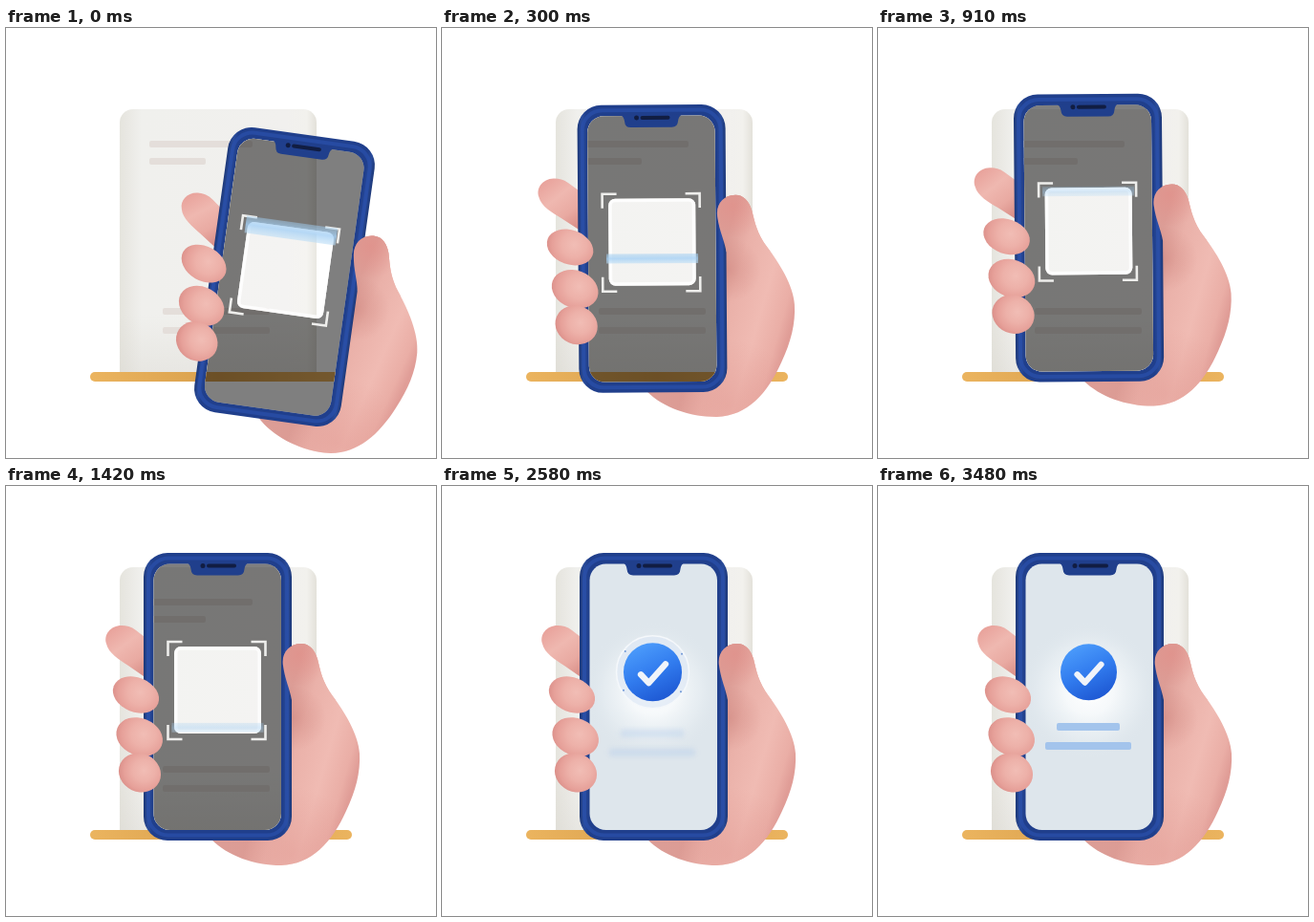
An HTML page with a canvas that plays this animation: 450x450 px, repeating every 3510 ms.

```html
<!DOCTYPE html>
<html lang="en">
<head>
<meta charset="utf-8">
<title>Scan to confirm</title>
<style>
  html, body { margin: 0; width: 100%; height: 100%; overflow: hidden; background: #fff; }
  canvas { display: block; width: 450px; height: 450px; }
</style>
</head>
<body>
<canvas id="stage"></canvas>
<script>
const SIZE = 450, LOOP = 3510, RAD = Math.PI / 180;
const canvas = document.getElementById('stage');
const ctx = canvas.getContext('2d');
const dpr = window.devicePixelRatio || 1;
canvas.width = canvas.height = SIZE * dpr;

// Settled phone centre; all phone and hand shapes are laid out around it.
const CX = 221.5, CY = 220.5;

const clamp = v => Math.max(0, Math.min(1, v));
const ramp = (t, a, b) => clamp((t - a) / (b - a));
const smooth = (t, a, b) => { const p = ramp(t, a, b); return p * p * (3 - 2 * p); };
const easeOut = p => 1 - (1 - p) ** 3;
const backOut = p => 1 + 2.7 * (p - 1) ** 3 + 1.7 * (p - 1) ** 2;

// Monotone cubic through [time, value] keys.
function track(keys, t) {
  const last = keys.length - 1;
  if (t <= keys[0][0]) return keys[0][1];
  if (t >= keys[last][0]) return keys[last][1];
  const slope = i => (keys[i + 1][1] - keys[i][1]) / (keys[i + 1][0] - keys[i][0]);
  const tangent = i => {
    if (i === 0 || i === last) return 0;
    const a = slope(i - 1), b = slope(i);
    return a * b > 0 ? 2 * a * b / (a + b) : 0;
  };
  let i = 0;
  while (t > keys[i + 1][0]) i++;
  const span = keys[i + 1][0] - keys[i][0], p = (t - keys[i][0]) / span;
  const p2 = p * p, p3 = p2 * p;
  return (2 * p3 - 3 * p2 + 1) * keys[i][1] + (p3 - 2 * p2 + p) * span * tangent(i)
    + (3 * p2 - 2 * p3) * keys[i + 1][1] + (p3 - p2) * span * tangent(i + 1);
}

const MOVE_X = [[0, 291.5], [300, 220], [580, 219], [1150, 221.5]];
const MOVE_Y = [[0, 260.5], [300, 231], [600, 218.3], [1150, 220.5]];
const TILT = [[0, 8], [300, -0.4], [600, -1.2], [1150, 0]];
const CURL = [[0, 0], [300, -1.4], [600, -4], [1150, 0]];

function gradient(g, stops) {
  stops.forEach(([at, color]) => g.addColorStop(at, color));
  return g;
}
const linear = (x0, y0, x1, y1, stops) => gradient(ctx.createLinearGradient(x0, y0, x1, y1), stops);
const radial = (x, y, r, stops) => gradient(ctx.createRadialGradient(x, y, 0, x, y, r), stops);

function box(x, y, w, h, r, fill) {
  ctx.beginPath();
  ctx.roundRect(x, y, w, h, r);
  ctx.fillStyle = fill;
  ctx.fill();
}

function stroke(path, color, width) {
  ctx.strokeStyle = color;
  ctx.lineWidth = width;
  ctx.stroke(path);
}

function basePose() {
  ctx.setTransform(dpr, 0, 0, dpr, 0, 0);
}

function phonePose(t) {
  basePose();
  ctx.translate(track(MOVE_X, t), track(MOVE_Y, t));
  ctx.rotate(track(TILT, t) * RAD);
  ctx.translate(-CX, -CY);
}

function drawPaper() {
  ctx.fillStyle = '#fff';
  ctx.fillRect(0, 0, SIZE, SIZE);
  box(119, 85, 206, 276, [14, 14, 0, 0], linear(119, 0, 325, 0, [
    [0, '#e5e4dd'], [0.04, '#e9e8e3'], [0.11, '#f0f0ed'], [0.85, '#f1f0ee'],
    [0.95, '#f2f1ed'], [1, '#e3e1da']]));
  box(119, 300, 206, 61, 0, linear(0, 300, 0, 361, [
    [0, 'rgba(215,212,205,0)'], [1, 'rgba(215,212,205,.35)']]));
  const line = '#e4deda';
  box(150, 118, 108, 7, 2, line);
  box(150, 136, 59, 7, 2, line);
  box(164, 293, 112, 7, 2, line);
  box(164, 313, 112, 7, 2, line);
  box(88, 360, 274, 10, 5, linear(88, 0, 362, 0, [
    [0, '#ebb45f'], [0.5, '#d9a04c'], [1, '#ebb45f']]));
}

const palm = new Path2D(
  'M309 165 C296 165 288 175 290 188 C292 203 297 212 299 224 L270 290 L215 370 ' +
  'C232 387 260 397 288 397 C320 396 341 373 356 340 C366 319 371 300 370 280 ' +
  'C369 260 354 236 342 220 C331 205 329 193 326 181 C323 171 317 165 309 165 Z');

function drawPalm() {
  ctx.fillStyle = linear(285, 260, 371, 285, [
    [0, '#dc9d96'], [0.25, '#eab1a9'], [0.62, '#f0bbb3'], [0.88, '#eaaea6'], [1, '#e09d97']]);
  ctx.fill(palm);
  ctx.save();
  ctx.clip(palm);
  const shade = (x, y, r, color) => {
    ctx.fillStyle = radial(x, y, r, [[0, color], [1, color.replace(/[\d.]+\)$/, '0)')]]);
    ctx.fillRect(x - r, y - r, 2 * r, 2 * r);
  };
  shade(306, 176, 34, 'rgba(226,142,136,.6)');
  shade(301, 243, 34, 'rgba(203,128,121,.45)');
  shade(300, 385, 70, 'rgba(221,145,138,.4)');
  ctx.restore();
}

const indexFinger = new Path2D(
  'M121 146 C109 146 102 156 105 165 C107 175 119 182 128 188 L154 206 L158 168 L136 151 C131 147 126 146 121 146 Z');

function fingerPose(t) {
  phonePose(t);
  ctx.translate(132, 235);
  ctx.rotate(track(CURL, t) * RAD);
  ctx.translate(-132, -235);
}

function drawIndex() {
  ctx.fillStyle = linear(112, 150, 146, 196, [
    [0, '#e9a49d'], [0.35, '#efb8b0'], [0.7, '#e9aaa2'], [1, '#d98f88']]);
  ctx.fill(indexFinger);
}

function drawFinger(x, y, rx, ry, angle) {
  ctx.save();
  ctx.translate(x, y);
  ctx.rotate(angle * RAD);
  ctx.beginPath();
  ctx.ellipse(0, 0, rx, ry, 0, 0, 7);
  ctx.fillStyle = radial(3, -4, rx * 1.15, [
    [0, '#f1bdb5'], [0.45, '#edb1a9'], [0.8, '#e6a099'], [1, '#dc918b']]);
  ctx.fill();
  ctx.restore();
}

function screenPath() {
  ctx.beginPath();
  ctx.roundRect(154.5, 81.5, 133.5, 278.5, 17);
}

function drawBody() {
  box(144, 70, 155, 301, 25, linear(144, 0, 299, 0, [
    [0, '#1d3878'], [0.03, '#2a4c9b'], [0.06, '#203f8c'], [0.94, '#203f8c'],
    [0.97, '#2a4c9b'], [1, '#1d3878']]));
  const rim = new Path2D();
  rim.roundRect(149, 75.5, 145, 290, 21);
  stroke(rim, 'rgba(42,79,170,.75)', 4);
}

function drawNotch() {
  ctx.fillStyle = '#203f8c';
  ctx.fill(new Path2D('M189 80 H254 Q250 82 249.5 87 Q249 93.5 243 93.5 H200 Q194 93.5 193.5 87 Q193 82 189 80 Z'));
  box(210, 81.5, 31, 4, 2, '#111d42');
  box(203.5, 81, 5, 5, 2.5, '#111d42');
}

function drawScanner(t) {
  const card = new Path2D();
  card.roundRect(176, 168, 91, 91, 7);
  const veil = new Path2D();
  veil.rect(144, 70, 155, 301);
  veil.addPath(card);
  ctx.fillStyle = 'rgba(0,0,0,.5)';
  ctx.fill(veil, 'evenodd');

  ctx.fillStyle = 'rgba(255,255,255,.2)';
  ctx.fill(card);
  ctx.save();
  ctx.clip(card);
  stroke(card, 'rgba(255,255,255,.85)', 7);
  ctx.restore();

  const corner = new Path2D('M-51 -36 V-51 H-36');
  for (let i = 0; i < 4; i++) {
    ctx.save();
    ctx.translate(220.5, 214);
    ctx.rotate(i * Math.PI / 2);
    stroke(corner, '#eeeeec', 2.6);
    ctx.restore();
  }

  const y = CY - 8 - 41 * Math.cos(t / 930 * 2 * Math.PI);
  const half = 5 + 4 * (1 - ramp(t, 0, 250));
  ctx.save();
  ctx.globalAlpha *= 0.85 - 0.4 * ramp(t, 300, 600);
  ctx.fillStyle = linear(0, y - half, 0, y + half, [
    [0, 'rgba(160,205,240,.55)'], [0.5, 'rgba(165,208,245,.95)'], [1, 'rgba(185,220,246,.65)']]);
  ctx.fillRect(173.5, y - half, 96, half * 2);
  ctx.restore();
}

function drawSpinner(t) {
  const alpha = smooth(t, 1720, 1800) * (1 - smooth(t, 2280, 2380));
  if (!alpha) return;
  const head = 145 + (t - 1880) * 0.6;
  const arc = new Path2D();
  arc.arc(220.5, 194, 23.5, (head - 62) * RAD, head * RAD);
  ctx.save();
  ctx.globalAlpha *= alpha;
  ctx.lineCap = 'round';
  stroke(arc, '#2f7fec', 7);
  ctx.restore();
}

function drawBadge(t) {
  const grow = ramp(t, 2270, 2520);
  if (!grow) return;
  const scale = backOut(grow) * (1 + 0.035 * (1 - smooth(t, 2580, 2850)));
  const halo = smooth(t, 2400, 2540) * (1 - smooth(t, 2600, 2900));
  ctx.save();
  ctx.translate(220.5, 194.7);

  if (halo) {
    const r = 31 + 7 * easeOut(ramp(t, 2400, 2620));
    ctx.save();
    ctx.globalAlpha *= halo;
    const ring = new Path2D();
    ring.arc(0, 0, r, 0, 7);
    ctx.fillStyle = 'rgba(222,233,246,.7)';
    ctx.fill(ring);
    stroke(ring, '#f5f8fb', 1.5);
    for (const a of [-143, -32, 35, 148]) {
      const x = (r - 2) * Math.cos(a * RAD), y = (r - 2) * Math.sin(a * RAD);
      box(x - 1, y - 1, 2, 2, 1, '#6c96d6');
    }
    ctx.restore();
  }

  ctx.scale(scale, scale);
  ctx.beginPath();
  ctx.arc(0, 0, 29.5, 0, 7);
  ctx.fillStyle = linear(-12, -28, 14, 28, [[0, '#4b9bfb'], [0.5, '#317bee'], [1, '#1d57d2']]);
  ctx.fill();
  ctx.save();
  ctx.globalAlpha *= smooth(t, 2380, 2500);
  ctx.lineCap = ctx.lineJoin = 'round';
  stroke(new Path2D('M-12 2.5 L-4 11 L13 -8'), '#f0f4fa', 6.2);
  ctx.restore();
  ctx.restore();
}

function drawLines(t) {
  const show = ramp(t, 2460, 2960);
  if (!show) return;
  const p = show * show * (3 - 2 * show);
  const drop = 8 * (1 - p), blur = 3 * (1 - p);
  ctx.save();
  ctx.globalAlpha *= Math.min(1, 0.15 + p) * smooth(t, 2460, 2560);
  if (blur > 0.05) ctx.filter = `blur(${blur * dpr}px)`;
  box(187, 248 + drop, 66, 8, 2, '#a3c4ec');
  box(175, 268 + drop, 90, 8, 2, '#a3c4ec');
  ctx.restore();
}

function drawResult(t) {
  ctx.fillStyle = '#dee6ec';
  ctx.fillRect(144, 70, 155, 301);
  ctx.fillStyle = radial(221, 214, 72, [
    [0, 'rgba(255,255,255,1)'], [0.35, 'rgba(250,252,253,.85)'], [0.7, 'rgba(240,245,248,.4)'],
    [1, 'rgba(222,230,236,0)']]);
  ctx.fillRect(144, 130, 155, 170);
  drawSpinner(t);
  drawBadge(t);
  drawLines(t);
}

function drawScreen(t) {
  const reveal = smooth(t, 1560, 1740);
  ctx.save();
  screenPath();
  ctx.clip();
  if (reveal < 1) {
    basePose();
    drawPaper();
    phonePose(t);
    drawScanner(t);
  }
  if (reveal) {
    ctx.globalAlpha = reveal;
    drawResult(t);
  }
  ctx.restore();
  drawNotch();
}

function draw(t) {
  basePose();
  drawPaper();

  fingerPose(t);
  drawIndex();
  phonePose(t);
  drawPalm();
  drawBody();
  drawScreen(t);

  // The thumb wraps over the right edge of the phone.
  ctx.save();
  ctx.beginPath();
  ctx.rect(280, 155, 70, 69);
  ctx.clip();
  drawPalm();
  ctx.restore();

  fingerPose(t);
  drawFinger(136, 218.5, 25, 18, 22);
  drawFinger(139.7, 262.5, 25, 19.5, 22);
  drawFinger(140, 300, 22.5, 20, 25);
}

const start = performance.now();
function frame() {
  draw((performance.now() - start) % LOOP);
  requestAnimationFrame(frame);
}
frame();
</script>
</body>
</html>
```
